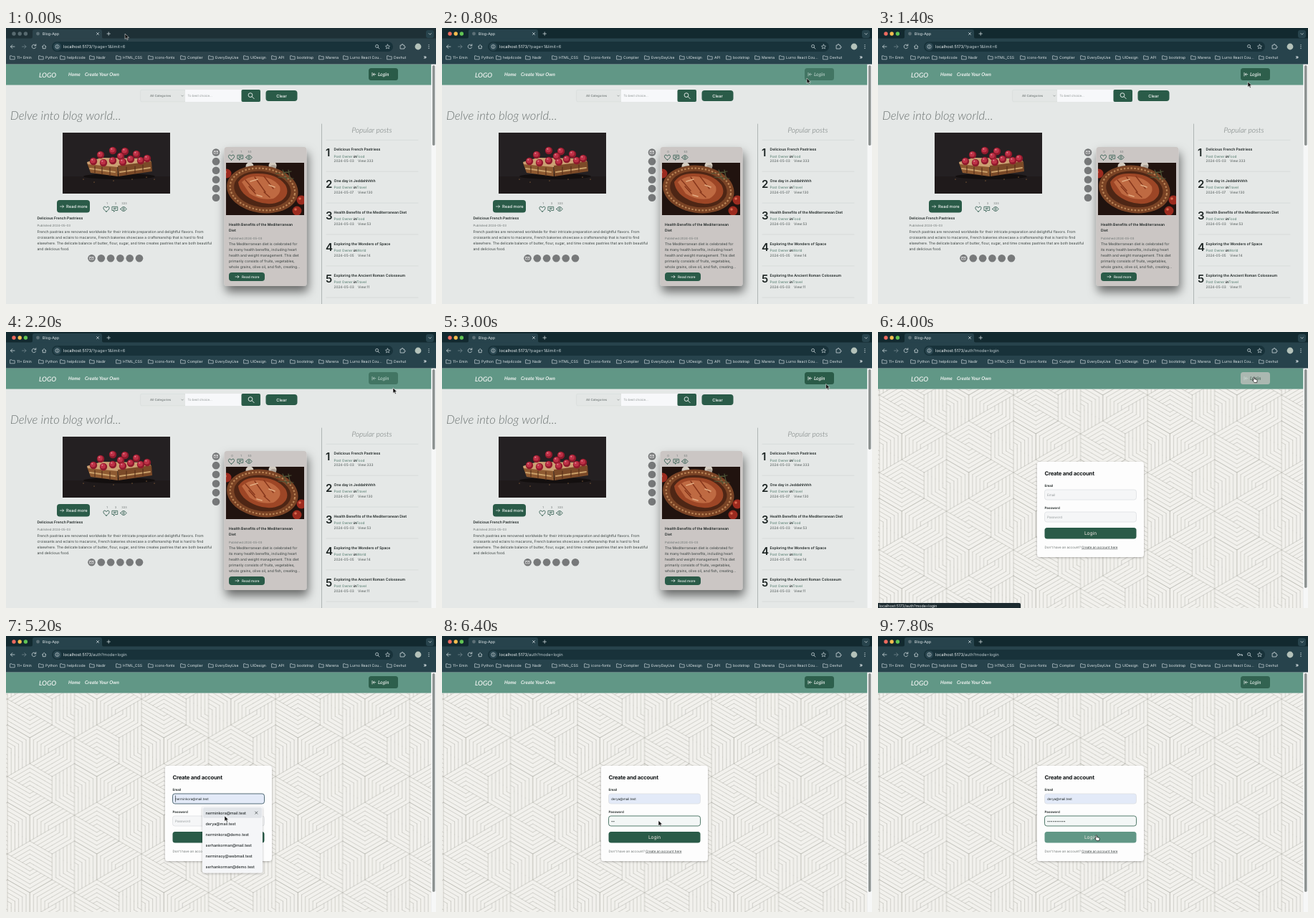
Write an HTML page that moves like this. It is 600x385 px and loops after 8 s.

```html
<!DOCTYPE html>
<html lang="en">
<head>
<meta charset="utf-8">
<title>Blog-App</title>
<style>
html, body { margin: 0; width: 100%; height: 100%; overflow: hidden; background: #e4e7e6; }
svg { display: block; width: 100vw; height: 100vh; }
text { font-family: Inter, sans-serif; white-space: pre; text-rendering: geometricPrecision; }
.slant { font-family: Lato, sans-serif; font-style: italic; }
</style>
</head>
<body>
<svg id="stage" viewBox="0 0 600 385"></svg>
<script>
const GREEN = '#2a5b48', MINT = '#619786', INK = '#1c2423', GREY = '#6d7473';

// --- drawing helpers ---
const attrs = o => Object.entries(o).map(([k, v]) => ` ${k}="${v}"`).join('');
const rect = (x, y, w, h, fill, r = 0, o = {}) =>
  `<rect x="${x}" y="${y}" width="${w}" height="${h}" rx="${r}" fill="${fill}"${attrs(o)}/>`;
const dot = (x, y, r, fill, o = {}) => `<circle cx="${x}" cy="${y}" r="${r}" fill="${fill}"${attrs(o)}/>`;
const oval = (x, y, rx, ry, fill, o = {}) =>
  `<ellipse cx="${x}" cy="${y}" rx="${rx}" ry="${ry}" fill="${fill}"${attrs(o)}/>`;
const line = (d, stroke, w = .8, o = {}) =>
  `<path d="${d}" fill="none" stroke="${stroke}" stroke-width="${w}" stroke-linecap="round" stroke-linejoin="round"${attrs(o)}/>`;
const shape = (d, fill, o = {}) => `<path d="${d}" fill="${fill}"${attrs(o)}/>`;
const text = (x, y, s, size, fill, weight = 400, o = {}) =>
  `<text x="${x}" y="${y}" font-size="${size}" fill="${fill}" font-weight="${weight}"${attrs(o)}>${s.replace(/&/g, '&amp;')}</text>`;
const slant = (x, y, s, size, fill, weight, o = {}) => text(x, y, s, size, fill, weight, { class: 'slant', ...o });
const group = (id, s, o = {}) => `<g id="${id}"${attrs(o)}>${s}</g>`;
const mid = { 'text-anchor': 'middle' };

// --- interlaced hexagon wallpaper: each cell is open along one of three axes ---
const R = 36, W = R * Math.sqrt(3), LINES = 6;
function hexWeave(cx, cy, axis) {
  const at = k => [R * Math.cos((2 * k + 1) * Math.PI / 6), R * Math.sin((2 * k + 1) * Math.PI / 6)];
  let d = '';
  for (let k = 0; k < 6; k++) {
    const a = at(k), b = at(k + 1), open = k % 3 === axis;
    for (let i = open ? 0 : 1; i <= LINES; i++) {
      const t = i / LINES;
      const p = a.map(v => v * t);
      const q = b.map((v, j) => open ? p[j] + v * (1 - t) : v * t);
      d += `M${(cx + p[0]).toFixed(2)} ${(cy + p[1]).toFixed(2)}L${(cx + q[0]).toFixed(2)} ${(cy + q[1]).toFixed(2)}`;
    }
  }
  return d;
}
function wallpaper() {
  let d = '';
  for (let r = 0; r <= 2; r++)
    for (let q = -1; q <= 3; q++) d += hexWeave(W * (q + r / 2), 1.5 * R * r, (q - r + 6) % 3);
  return line(d, '#b3b2ac', .55);
}
const defs = `<defs>
  <pattern id="weave" x="2" y="52" width="${3 * W}" height="${3 * R}" patternUnits="userSpaceOnUse">
    ${rect(0, 0, 3 * W, 3 * R, '#f2f1ed')}${wallpaper()}
  </pattern>
  <filter id="deep" x="-30%" y="-20%" width="160%" height="150%"><feDropShadow dx="2" dy="8" stdDeviation="7" flood-opacity=".55"/></filter>
  <filter id="soft" x="-20%" y="-20%" width="140%" height="140%"><feDropShadow dx="0" dy="1" stdDeviation="1.5" flood-opacity=".28"/></filter>
  <clipPath id="dishClip">${rect(307, 188, 109, 73, '#000')}</clipPath>
</defs>`;

// --- browser frame ---
const bookmarks = [[15, '11+ Emin'], [55, 'Python'], [85, 'help4code'], [126, 'Nadir'], [163, 'HTML_CSS'],
  [208, 'icons-fonts'], [253, 'Complier'], [292, 'EveryDayUse'], [341, 'UIDesign'], [380, 'API'],
  [406, 'bootstrap'], [446, 'Marena'], [480, 'Lurno React Cou...'], [541, 'Devhut']];
const folder = x => line(`M${x} 38.8h2l.8 1h3.4v4h-6.2z`, '#c3d0d4', .7);

function browser() {
  const pale = '#c9d5d8';
  return rect(0, 0, 600, 50, '#12292f', 0, { id: 'strip' }) +
    shape('M34 15q3 0 3-3V5q0-3 3-3h91q3 0 3 3v7q0 3 3 3z', '#27434c', { class: 'bar' }) +
    rect(0, 14.5, 600, 36, '#27434c', 0, { class: 'bar' }) +
    ['#ee6a5f', '#f5bd4f', '#61c454'].map((c, i) => dot(11 + 8.2 * i, 8, 2.7, c, { class: 'light' })).join('') +
    dot(44.5, 8, 2.4, '#5d7178') + text(51, 10, 'Blog-App', 5.2, '#e5ecee') +
    line('M126.5 6.5l3 3m0-3l-3 3M141 8h4.4m-2.2-2.2v4.4', pale) +
    rect(586, 3, 11, 11, '#27434c', 3) + line('M590 7.5l1.7 1.7 1.7-1.7', pale) +
    line('M12 26H6.5m2.3-2.4L6.5 26l2.3 2.4', pale) + line('M22.5 26H28m-2.3-2.4L28 26l-2.3 2.4', '#71868d') +
    line('M41.4 24.4a2.8 2.8 0 1 0 .2 2.6m.2-4.4v2.2h-2.2M50.5 26l2.7-2.6 2.7 2.6m-4.6-.5v3.2h3.8v-3.2', pale) +
    rect(64, 19, 476, 14, '#18323a', 7) + rect(66, 20.5, 11, 11, '#2c4852', 5.5) +
    dot(71.5, 26, 2.6, 'none', { stroke: pale, 'stroke-width': .7 }) + line('M71.5 25.8v1.5m0-2.7v.1', pale, .7) +
    `<text y="28" x="80" font-size="5.8" fill="#f2f6f7">localhost:5173<tspan id="path" fill="#c1cdd1"></tspan></text>` +
    group('key', dot(503, 26, 1.5, 'none', { stroke: pale, 'stroke-width': .8 }) + line('M504.5 26h4v1.5m-1.6-1.5v1.2', pale)) +
    dot(517.6, 25.4, 2, 'none', { stroke: pale, 'stroke-width': .8 }) + line('M519 27l2 2', pale) +
    line('M532.5 23l.9 1.9 2.1.3-1.5 1.5.4 2.1-1.9-1-1.9 1 .4-2.1-1.5-1.5 2.1-.3z', pale, .7) +
    line('M550.5 24h1.6q-.2-1.6 1-1.6t1 1.6h1.6v1.6q1.6-.2 1.6 1t-1.6 1v1.4h-5.2z', pale) +
    dot(575, 26, 4.4, '#b4c2ba') +
    [23.6, 26, 28.4].map(y => dot(590, y, .65, pale)).join('') +
    bookmarks.map(([x, s]) => folder(x - 9) + text(x, 43.3, s, 5.1, '#dfe7e9')).join('') +
    text(582.5, 43.3, '»', 7, '#e5ecee', 700);
}

const siteHeader = () => rect(0, 50.5, 593.5, 29, MINT) +
  slant(46, 68.6, 'LOGO', 9.2, '#f1f4f2', 600) +
  slant(87, 67.3, 'Home', 6.7, '#f1f4f2', 700) + slant(110, 67.3, 'Create Your Own', 6.7, '#f1f4f2', 700) +
  group('account', rect(506, 56, 41, 17, GREEN, 3.5, { id: 'accountBox' }) +
    line('M511 62.4v4.6m1.4-2.3h3.4m-1.9-1.6l-1.8 1.6 1.8 1.6', '#f1f4f2', .8) +
    slant(519, 67, 'Login', 6.9, '#f1f4f2', 600, { id: 'accountText' }));

// --- blog page ---
function stats(xs, y, values) {
  const [a, b, c] = xs, ink = '#315d50';
  return xs.map((x, i) => text(x + 1, y - 6.2, values[i], 4, GREY, 400, mid)).join('') +
    line(`M${a} ${y + 3.6}c-5.5-3.4-4.6-7-2.4-7q1.7 0 2.4 1.7.7-1.7 2.4-1.7c2.2 0 3.1 3.6-2.4 7z`, ink, .9) +
    line(`M${b - 3.7} ${y - 3.2}h7.4v5.2h-3.2l-2 1.8v-1.8h-2.2zm2 1.9h3.6m-3.6 1.5h2.4`, ink) +
    line(`M${c - 4.2} ${y}q4.2-6.2 8.4 0-4.2 6.2-8.4 0z`, ink, .9) + dot(c, y, 1.3, 'none', { stroke: ink, 'stroke-width': .8 });
}

const share = spots => spots.map(([x, y], i) => dot(x, y, 5.3, '#77797a') +
  (i ? '' : line(`M${x - 2.5} ${y - 1.8}h5v3.6h-5zl2.5 2 2.5-2`, '#f0f0f0', .7))).join('');

const arrowRight = (x, y) => line(`M${x} ${y}h5m-1.7-1.6l1.7 1.6-1.7 1.6`, '#f4f6f5', .7);

function tart() {
  const berries = [[122, 186], [132, 177], [136, 188], [149, 171], [166, 172], [160, 179], [182, 176],
    [149, 185], [163, 187], [174, 183], [188, 185], [197, 182]];
  return rect(79, 146, 150, 85, '#242022') + rect(79, 207, 150, 24, '#1f1a1b') +
    oval(158, 207, 50, 4, '#130f0f') +
    shape('M113 188l42-2 1 21-38-5z', '#8e5a31') + shape('M113 187l20-6 66 1 4 5-47 7-42-4z', '#cba173') +
    shape('M156 192l47-6 1 14-47 7z', '#7b4a28') + line('M117 196l35 5m7 0l42-6', '#c99f69', 1.8) +
    line('M124 193v9m10-8v10m11-9v11m23-12v10m12-11v9m11-11v9', '#57301a', 1.2) +
    berries.map(([x, y]) => dot(x, y, 5.2, '#8f1a2c') + dot(x - .7, y - 1, 3.6, '#bf3147') +
      dot(x - 1.6, y - 2.2, 1, '#e08591')).join('') +
    [[108, 211], [123, 215], [150, 213], [176, 211], [196, 208], [207, 211]].map(([x, y]) => oval(x, y, 1.1, .6, '#7d5a3a')).join('');
}

function dish() {
  const tilt = { transform: 'rotate(8 358 224)' };
  return '<g clip-path="url(#dishClip)">' + rect(307, 188, 109, 73, '#21130f') +
    [[340, 193], [372, 192]].map(([x, y]) => dot(x, y, 5.5, '#d3cbc0') + oval(x + 1, y + 2, 4, 3, '#aaa095')).join('') +
    oval(358, 225, 50, 33, '#7a4325', tilt) +
    oval(358, 225, 45.5, 29, 'none', { stroke: '#b98355', 'stroke-width': 2.2, 'stroke-dasharray': '2.4 2.4', ...tilt }) +
    oval(358, 225, 40, 25, '#4e2615', tilt) +
    shape('M324 215q8-13 28-12 26 0 38 16 7 13-6 22-15 8-34 1-24-9-26-27z', '#9d4626') +
    shape('M329 215q9-9 23-8 21 1 30 14 3 10-9 17-18 3-33-7z', '#bf6a42') +
    line('M334 212l13 15m0-19l15 21m-2-22l13 17m-34-3l9 10m12-2l8 7', '#87371c', 1.4) +
    line('M341 214l10-3m16 8l8 3m-25 11l7 2', '#e2aa80', 1.6) +
    line('M376 203l22-3m-18 8l21 2m-15-12l6 14m2-14l3 14', '#4f5537', 1.2) +
    [[412, 240], [406, 255], [308, 203]].map(([x, y]) => dot(x, y, 6.5, '#9c2b1f') + dot(x - 2, y - 2, 1.8, '#d9694f')).join('') + '</g>';
}

const posts = [['Delicious French Pastriess', 'Food', '2024-05-03', 333], ['One day in Jeddahhhhh', 'Travel', '2024-05-07', 130],
  ['Health Benefits of the Mediterranean Diet', 'Food', '2024-05-03', 53], ['Exploring the Wonders of Space', 'World', '2024-05-05', 14],
  ['Exploring the Ancient Roman Colosseum', 'Travel', '2024-05-03', 11]];

function popular() {
  const rows = posts.map(([title, topic, date, views], i) => {
    const y = 171.3 + 43.9 * i;
    return line(`M447 ${y - 15}H575`, '#cdd2d0', .6) + text(446, y + 8, String(i + 1), 15, INK, 600) +
      text(457.5, y, title, 5.08, INK, 600) +
      `<text x="457.5" y="${y + 9.2}" font-size="4.75" fill="#4c7668">Post Owner <tspan font-style="italic" font-weight="700" fill="${INK}">in</tspan>${topic}</text>` +
      text(457.5, y + 16, date, 4.8, '#4e5655') + text(491, y + 16, 'View:' + views, 4.8, '#4e5655');
  });
  return line('M440.5 134V385', '#a3a9a7', .8) + slant(510.5, 146, 'Popular posts', 10.2, '#6b7271', 300, mid) +
    rows.join('') + line('M447 376H575', '#cdd2d0', .6);
}

const paragraph = (x, y, lines) => lines.map((s, i) => text(x, y + 8.1 * i, s, 5.02, '#38403f')).join('');

function home() {
  return rect(0, 79.5, 593.5, 306, '#e5e8e7') +
    rect(187.5, 86.3, 63, 16.5, '#e3e6e5', 2, { stroke: '#d6dad8', 'stroke-width': .6 }) +
    text(201, 96.3, 'All Categories', 4.3, '#7c8382', 600) + line('M244.8 94l1.3 1.3 1.3-1.3', GREY, .6) +
    rect(250, 86, 78.5, 17, '#f7f8fa') + text(253.5, 96.3, 'To best choice...', 4.4, '#8d9392') +
    rect(328.5, 86, 26.5, 17, GREEN, 2) + dot(341, 93.6, 2.9, 'none', { stroke: '#f4f6f5', 'stroke-width': .9 }) + line('M343.3 95.8l2.8 2.8', '#f4f6f5', .9) +
    rect(362.5, 87, 44, 15, GREEN, 4) + text(384.5, 96.6, 'Clear', 5.8, '#f4f6f5', 500, mid) +
    slant(6, 127.7, 'Delve into blog world...', 16.7, '#6b7271', 300) +
    tart() + rect(71, 240, 46, 17.5, GREEN, 4) + arrowRight(75.5, 249) + text(84, 250.8, 'Read more', 5.8, '#f4f6f5', 500) +
    stats([140, 152, 164], 252.5, ['1', '3', '333']) +
    text(43.5, 267.2, posts[0][0], 5, INK, 600) + text(43.5, 277.4, 'Published:2024-05-03', 4.3, GREY) +
    paragraph(43.5, 285.6, ['French pastries are renowned worldwide for their intricate preparation and delightful flavors. From',
      'croissants and eclairs to macarons, French bakeries showcase a craftsmanship that is hard to find',
      'elsewhere. The delicate balance of butter, flour, sugar, and time creates pastries that are both beautiful',
      'and delicious food.']) +
    share([...Array(6)].map((_, i) => [119.5 + 13.3 * i, 321.3])) +
    share([...Array(6)].map((_, i) => [293, 173.5 + 12.65 * i])) +
    rect(304.5, 166, 115, 194, '#cbc6c4', 4, { filter: 'url(#deep)' }) + stats([314.5, 327, 339], 180.5, ['0', '1', '53']) + dish() +
    text(311, 276, 'Health Benefits of the Mediterranean', 5, INK, 600) + text(311, 284.2, 'Diet', 5, INK, 600) +
    text(311, 294.8, 'Published:2024-05-03', 4.3, GREY) +
    paragraph(311, 303, ['The Mediterranean diet is celebrated for', 'its many health benefits, including heart',
      'health and weight management. This diet', 'primarily consists of fruits, vegetables,', 'whole grains, olive oil, and fish, creating...']) +
    rect(311, 341, 50, 12, GREEN, 4) + arrowRight(320, 347) + text(329, 348.8, 'Read more', 4.8, '#f4f6f5', 500) +
    popular();
}

// --- login page ---
const emails = ['nerminkora@mail.test', 'derya@mail.test', 'nerminkora@demo.test', 'serhankorman@mail.test',
  'nerminsoy@webmail.test', 'serhankorman@demo.test'];

const field = (id, y) => rect(232.5, y, 128, 14, '#f5f6f7', 3.2, { id: id + 'Box', 'stroke-width': .8 }) +
  text(236, y + 8.7, '', 4.55, GREY, 400, { id: id + 'Text' });

function auth() {
  return rect(0, 79.5, 593.5, 306, 'url(#weave)') + rect(222, 181, 149, 133, '#fdfdfd', 4, { filter: 'url(#soft)' }) +
    text(232.5, 200.3, 'Create and account', 7.7, '#15191a', 700, { 'letter-spacing': '-.03em' }) +
    text(232.5, 215.6, 'Email', 4.5, INK, 600) + field('email', 220) +
    text(232.5, 246.7, 'Password', 4.5, INK, 600) + field('pass', 251) + rect(236, 222.5, .6, 9, INK, 0, { id: 'caret' }) +
    rect(232.5, 273, 128, 15.6, GREEN, 3.5, { id: 'submit' }) + text(296.5, 283.2, 'Login', 6.6, '#f3e9e5', 400, mid) +
    text(232.5, 301.7, "Don't have an account?", 4.55, GREY) +
    text(284, 301.7, 'Create an account here', 4.55, '#3a4241', 400, { 'text-decoration': 'underline' }) +
    group('menu', rect(274, 237.5, 84, 93, '#f5f6f8', 3, { filter: 'url(#soft)' }) +
      rect(275, 239.3, 82, 14.5, '#e2e5e9', 2, { id: 'pick' }) +
      emails.map((s, i) => text(278.5, 248.6 + 15 * i, s, 5.4, '#23292a', 500)).join('') +
      group('cross', line('M347.7 245l3.2 3.2m0-3.2l-3.2 3.2', '#454c4d', .8)));
}

const arrow = shape('M0 0v7.4l1.8-1.6 1.2 2.7 1.3-.6-1.2-2.6h2.4z', '#111', { stroke: '#fff', 'stroke-width': .5 });
const hand = shape('M-1 4.6V.7q0-.9.8-.9t.8.9v2l2.6.6q1 .3.9 1.4L3.7 7.6H.2L-2.6 4.3q.5-1 1.6.3z', '#fff', { stroke: '#111', 'stroke-width': .7 });

const stage = document.getElementById('stage');
stage.innerHTML = defs + group('home', home()) + group('auth', auth()) + siteHeader() +
  rect(593.5, 50.5, 6.5, 335, '#f6f7f7') + rect(595, 52, 3.6, 112, '#8d9291', 1.8, { id: 'thumb' }) + browser() +
  group('status', rect(-2, 378, 201, 9, '#1d2b30', 2) + text(1.5, 383.9, 'localhost:5173/auth?mode=login', 5.3, '#eef2f3')) +
  group('arrow', arrow) + group('hand', hand);

// --- animation ---
const el = {};
stage.querySelectorAll('[id]').forEach(n => el[n.id] = n);
const bars = stage.querySelectorAll('.bar'), lights = [...stage.querySelectorAll('.light')];
const lightFills = lights.map(n => n.getAttribute('fill'));

const pointer = [[0, 166, 8], [200, 190, 14], [400, 340, 42], [600, 470, 66], [800, 509, 70], [1400, 516, 75],
  [2200, 540, 78], [2800, 541, 77], [3400, 525, 63], [4000, 525, 63], [4400, 430, 150], [4800, 310, 227],
  [5000, 304, 230], [5200, 305, 251], [5400, 304, 261], [5800, 304, 261], [6200, 302, 257], [7200, 302, 259], [7600, 305, 278], [8000, 305, 278]];
const pulse = [[0, 1], [800, .55], [1500, 1], [2200, .55], [3000, 1], [3400, .55], [3800, .95], [4000, .7],
  [4300, .5], [5100, 1], [5800, .5], [6500, 1], [7200, .5], [7800, .85], [8000, .95]];

function track(keys, t) {
  const i = Math.max(1, keys.findIndex(k => k[0] > t));
  const a = keys[i - 1], b = keys[i], f = (t - a[0]) / (b[0] - a[0]);
  return a.slice(1).map((v, j) => v + (b[j + 1] - v) * f);
}
const show = (node, on) => node.style.display = on ? '' : 'none';
const set = (node, o) => { for (const k in o) node.setAttribute(k, o[k]); };
const span = (t, a, b) => t >= a && t < b;

function draw(time) {
  const t = Math.floor(time / 200) * 200; // advance in steps of 200 ms
  const focused = t >= 400, onAuth = t >= 4000, filled = t >= 5600;
  const overAccount = span(t, 3200, 4200), overSubmit = t >= 7400, menu = span(t, 5000, 5600);
  const emailFocus = span(t, 4800, 6200), passFocus = t >= 6200;

  set(el.strip, { fill: focused ? '#12292f' : '#1e3036' });
  bars.forEach(n => set(n, { fill: focused ? '#27434c' : '#2c434b' }));
  lights.forEach((n, i) => set(n, { fill: focused ? lightFills[i] : '#586a70' }));
  el.path.textContent = t >= 3800 ? '/auth?mode=login' : '/?page=1&limit=6';
  show(el.key, t >= 7400);
  show(el.status, span(t, 3200, 4400));
  show(el.home, !onAuth);
  show(el.auth, onAuth);
  set(el.thumb, { height: onAuth ? 305 : 112 });

  set(el.account, { opacity: track(pulse, t)[0] });
  set(el.accountBox, { fill: overAccount ? '#cbc6c4' : GREEN });
  set(el.accountText, { fill: overAccount ? '#4a5a50' : '#f1f4f2' });

  const row = t >= 5400 ? 1 : 0;
  show(el.menu, menu);
  show(el.pick, t >= 5200);
  show(el.cross, t >= 5200);
  set(el.pick, { y: 239.3 + 15 * row });
  set(el.cross, { transform: `translate(0 ${15 * row})` });

  const preview = filled || t >= 5200;
  el.emailText.textContent = filled ? emails[1] : preview ? emails[row] : 'Email';
  set(el.emailText, { fill: preview ? INK : '#979d9e' });
  set(el.emailBox, { fill: preview ? '#e3eaf8' : '#f5f6f7', stroke: emailFocus ? '#2b4a56' : '#dde0e2' });

  const typed = Math.min(10, Math.max(0, Math.round((t - 6200) / 100)));
  el.passText.textContent = typed ? '•'.repeat(typed) : 'Password';
  set(el.passText, { fill: typed ? INK : '#979d9e' });
  set(el.passBox, { fill: passFocus ? '#f3f7f6' : '#f5f6f7', stroke: passFocus ? GREEN : '#dde0e2' });
  show(el.caret, emailFocus && !filled);
  set(el.submit, { fill: overSubmit ? MINT : GREEN });

  const [x, y] = track(pointer, t), pointing = overAccount || overSubmit;
  show(el.arrow, !pointing);
  show(el.hand, pointing);
  set(pointing ? el.hand : el.arrow, { transform: `translate(${x} ${y})` });
}

const start = performance.now();
function tick() {
  draw((performance.now() - start) % 8000);
  requestAnimationFrame(tick);
}
tick();
</script>
</body>
</html>
```
